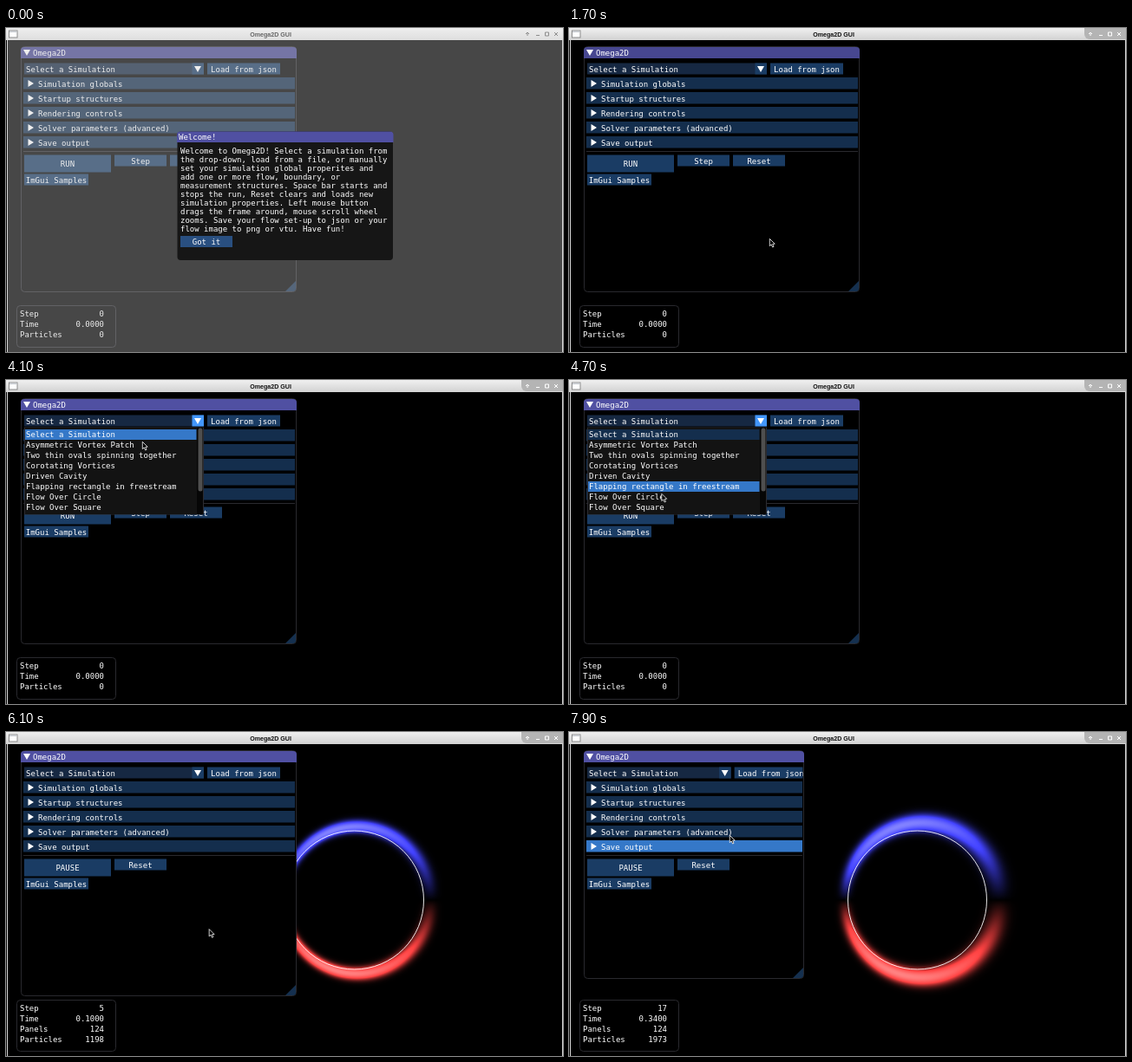
These frames come from a looping animation (642x374 px, 8000 ms). An HTML page with a canvas:

```html
<!DOCTYPE html>
<html lang="en">
<head>
<meta charset="utf-8">
<title>Omega2D GUI</title>
<style>
html, body { margin: 0; width: 642px; height: 374px; overflow: hidden; background: #000; }
canvas { display: block; }
</style>
</head>
<body>
<canvas id="stage" width="642" height="374"></canvas>
<script>
const LOOP = 8000, TICK = 100;
const ctx = document.getElementById('stage').getContext('2d');
const MONO = '9px "DejaVu Sans Mono", "Noto Sans Mono", monospace';
const C = {
  text: '#fff', button: '#1a3c64', header: '#142e4d', hot: '#3578c8', bright: '#4296fa',
  frame: '#162842', border: '#29292e', active: '#5050a2', idle: '#474790'
};
const HEADERS = ['Simulation globals', 'Startup structures', 'Rendering controls',
  'Solver parameters (advanced)', 'Save output'];
const CASES = ['Select a Simulation', 'Asymmetric Vortex Patch', 'Two thin ovals spinning together',
  'Corotating Vortices', 'Driven Cavity', 'Flapping rectangle in freestream',
  'Flow Over Circle', 'Flow Over Square'];
const WELCOME = ['Welcome to Omega2D! Select a simulation from',
  'the drop-down, load from a file, or manually', 'set your simulation global properites and',
  'add one or more flow, boundary, or', 'measurement structures. Space bar starts and',
  'stops the run, Reset clears and loads new', 'simulation properties. Left mouse button',
  'drags the frame around, mouse scroll wheel', 'zooms. Save your flow set-up to json or your',
  'flow image to png or vtu. Have fun!'];

// time, x, y
const POINTER = [
  [500, 630, 321], [800, 470, 300], [1300, 231, 243], [2000, 231, 243], [2400, 220, 83],
  [2700, 220, 83], [2800, 216, 46], [3700, 216, 46], [4000, 178, 62], [4100, 157, 71],
  [4600, 108, 126], [4800, 105, 136], [4900, 105, 136], [5000, 107, 133], [5700, 107, 133],
  [6400, 329, 298], [6700, 329, 298], [6900, 305, 286], [7000, 305, 286], [7400, 264, 278],
  [7600, 240, 230], [7800, 190, 131], [7900, 185, 119]
];
// time, right, bottom
const CORNER = [[6700, 335, 305], [6900, 329, 302], [7000, 329, 302], [7500, 271, 285]];

function along(keys, t) {
  if (t <= keys[0][0]) return keys[0].slice(1);
  for (let i = 1; i < keys.length; i++) {
    const a = keys[i - 1], b = keys[i];
    if (t <= b[0]) {
      const k = (t - a[0]) / (b[0] - a[0]);
      return [a[1] + (b[1] - a[1]) * k, a[2] + (b[2] - a[2]) * k];
    }
  }
  return keys[keys.length - 1].slice(1);
}

function rect(x, y, r, b, color) {
  ctx.fillStyle = color;
  ctx.fillRect(x, y, r - x, b - y);
}

function poly(color, ...p) {
  ctx.beginPath();
  for (let i = 0; i < p.length; i += 2) ctx.lineTo(p[i], p[i + 1]);
  ctx.closePath();
  ctx.fillStyle = color;
  ctx.fill();
}

function text(s, x, y, align = 'left') {
  ctx.font = MONO;
  ctx.textAlign = align;
  ctx.fillStyle = C.text;
  ctx.fillText(s, x, y);
}

function box(x, y, r, b, fill, stroke) {
  ctx.beginPath();
  ctx.roundRect(x + .5, y + .5, r - x - 1, b - y - 1, 4);
  ctx.fillStyle = fill;
  ctx.fill();
  if (stroke) {
    ctx.strokeStyle = stroke;
    ctx.lineWidth = 1;
    ctx.stroke();
  }
}

function button(label, x, y, r, b, color = C.button) {
  rect(x, y, r, b, color);
  text(label, (x + r) / 2, (y + b) / 2 + 3.5, 'center');
}

function band(x, y, r, b, radii, color) {
  ctx.beginPath();
  ctx.roundRect(x, y, r - x, b - y, radii);
  ctx.fillStyle = color;
  ctx.fill();
}

const flow = document.createElement('canvas');
flow.width = flow.height = 240;
const flowCtx = flow.getContext('2d');
let flowStep = -1;

// Two shear layers outside the wall, blue above and red below, thickening downstream.
function paintFlow(step) {
  if (step === flowStep) return;
  flowStep = step;
  const img = flowCtx.createImageData(240, 240);
  const growth = Math.sqrt(step / 17);
  for (let i = 0; i < 240 * 240; i++) {
    const x = i % 240 - 119, y = Math.floor(i / 240) - 119.5;
    const r = Math.hypot(x, y) || 1, cos = x / r, sin = y / r;
    const mid = 80 + 9 * growth * (1 + .6 * cos);
    const sigma = 2.6 + 3.7 * growth * (1 + .45 * cos);
    const amp = 1.9 * Math.min(1, step / 2) * Math.abs(sin) ** .9 * (1 - .25 * cos);
    const v = 255 * amp * Math.exp(-(((r - mid) / sigma) ** 2) / 2);
    img.data[i * 4] = sin > 0 ? v : v * .26;
    img.data[i * 4 + 1] = v * .26;
    img.data[i * 4 + 2] = sin > 0 ? v * .26 : v;
    img.data[i * 4 + 3] = 255;
  }
  flowCtx.putImageData(img, 0, 0);
}

function drawFlow(step) {
  if (step > 0) {
    paintFlow(step);
    ctx.drawImage(flow, 282, 74);
  }
  ctx.beginPath();
  ctx.arc(401.5, 194, 80, 0, Math.PI * 2);
  ctx.strokeStyle = '#fff';
  ctx.lineWidth = .9;
  ctx.stroke();
}

function drawPanel(t, hover) {
  const running = t >= 5400, open = t >= 3500 && !running;
  const [right, bottom] = along(CORNER, t);
  box(17, 21, right, bottom, '#000', C.border);
  band(17, 22, right, 35, [4, 4, 0, 0], t < 3500 ? C.idle : C.active);
  poly(C.text, 20, 25, 28, 25, 24, 32);
  text('Omega2D', 31, 31.7);

  ctx.save();
  ctx.beginPath();
  ctx.rect(17, 35, right - 18.5, bottom - 35);
  ctx.clip();
  const comboRight = 228 - .646 * (335 - right);
  const comboHot = t >= 2800 && !running;
  rect(21, 40.5, comboRight, 53.5, comboHot && !open ? '#173252' : C.frame);
  rect(comboRight - 13.5, 40.5, comboRight, 53.5, comboHot ? C.bright : C.button);
  poly(C.text, comboRight - 11, 44, comboRight - 3, 44, comboRight - 7, 51);
  text(CASES[0], 23, 50.6);
  button('Load from json', comboRight + 4, 40.5, comboRight + 88, 53.5);

  HEADERS.forEach((label, i) => {
    const y = 57 + 17 * i;
    const hot = !open && hover && hover[0] > 20 && hover[0] < right &&
      hover[1] >= y - 3 && hover[1] < y + 9;
    rect(20, y, right - 2, y + 13.5, hot ? C.hot : C.header);
    poly(C.text, 25.5, y + 3, 25.5, y + 11, 32, y + 7);
    text(label, 37, y + 10.6);
  });
  rect(20, 142, right - 2, 143, C.border);
  button(running ? 'PAUSE' : 'RUN', 21, 146.5, 121, 166.5);
  const actions = running ? ['Reset'] : ['Step', 'Reset'];
  actions.forEach((label, i) => button(label, 125 + 64 * i, 146.5, 185 + 64 * i, 159.5));
  button('ImGui Samples', 21, 168.5, 95, 181.5);
  ctx.restore();

  const grip = t >= 6800 && t < 7500 ? C.bright : t >= 6400 && t < 6800 ? '#2c65a8' : '#15304f';
  poly(grip, right - 1, bottom - 13, right - 1, bottom - 3, right - 3, bottom - 1, right - 13, bottom - 1);
}

function drawList(hover) {
  rect(21, 54.5, 228, 155.5, '#2c2c31');
  rect(22, 55, 227, 155, '#131313');
  CASES.forEach((label, i) => {
    const y = 57 + 12 * i;
    const hot = i === 0 ? hover[1] < 69 : hover[1] >= y && hover[1] < y + 12;
    if (hot || i === 0) rect(22, y, 219.5, y + 12, hot ? C.hot : C.header);
    text(label, 23, y + 9.4);
  });
  rect(220, 55, 227, 155, '#060606');
  box(221, 55, 227, 129, '#4f4f4f');
}

function drawStats(running, step) {
  const rows = [['Step', step], ['Time', (step * .02).toFixed(4)]];
  if (running) rows.push(['Panels', 124]);
  const count = running ? Math.round(255 + 1904.9 * (1 - Math.exp(-step / 7.32))) : 0;
  rows.push(['Particles', count]);
  box(12, running ? 309 : 320, 127, 369, '#000', C.border);
  rows.forEach(([name, value], i) => {
    const y = (running ? 322 : 333) + 12 * i;
    text(name, 16, y);
    text(value, 113, y, 'right');
  });
}

function drawWelcome(hot) {
  rect(2, 14, 641, 374, 'rgba(204,204,204,.35)');
  box(197, 119, 446.5, 268.5, '#161616');
  band(197, 119.5, 446.5, 132, [4, 4, 0, 0], C.active);
  text('Welcome!', 199, 129.4);
  WELCOME.forEach((line, i) => text(line, 201, 145.4 + 10 * i));
  button('Got it', 201, 240, 261, 253, hot ? C.bright : '#294f80');
}

function drawTitleBar(focused) {
  const g = ctx.createLinearGradient(0, 0, 0, 14);
  g.addColorStop(0, focused ? '#f0f0f0' : '#eeeeee');
  g.addColorStop(1, focused ? '#d2d2d2' : '#dedede');
  ctx.fillStyle = g;
  ctx.fillRect(0, 0, 642, 14);
  if (focused) band(594, 0, 642, 13, [0, 0, 0, 6], '#b4b4b4');
  rect(3, 2.5, 13.5, 11.5, '#8a8a8a');
  rect(4, 3.5, 12.5, 10.5, '#fff');
  rect(4, 3.5, 12.5, 5, '#c8ccd2');
  ctx.font = 'bold 7.1px "Liberation Sans", Arial, sans-serif';
  ctx.textAlign = 'center';
  ctx.fillStyle = focused ? '#111' : '#666';
  ctx.fillText('Omega2D GUI', 305, 9.6);

  ctx.strokeStyle = focused ? '#fff' : '#8c8c8c';
  ctx.lineWidth = 1;
  ctx.beginPath();
  ctx.moveTo(599, 7); ctx.lineTo(601, 5); ctx.lineTo(603, 7);
  ctx.moveTo(601, 5); ctx.lineTo(601, 9);
  ctx.moveTo(611, 8.5); ctx.lineTo(615, 8.5);
  ctx.rect(621.5, 5, 4, 4);
  ctx.moveTo(632, 5); ctx.lineTo(636, 9);
  ctx.moveTo(636, 5); ctx.lineTo(632, 9);
  ctx.stroke();
}

function drawPointer([x, y]) {
  ctx.save();
  ctx.translate(x, y);
  ctx.lineJoin = 'round';
  poly('#000', .3, .3, .3, 8.6, 2.2, 6.9, 3.6, 10, 5, 9.4, 3.7, 6.4, 6.2, 6.2);
  ctx.strokeStyle = '#fff';
  ctx.lineWidth = .8;
  ctx.stroke();
  ctx.restore();
}

function stepAt(t) {
  if (t <= 5500) return 0;
  if (t <= 6900) return Math.round((t - 5500) / 1400 * 11);
  return 11 + Math.round(Math.max(0, t - 7000) / 900 * 6);
}

function draw(t) {
  const running = t >= 5400, step = stepAt(t);
  const pointer = along(POINTER, t);
  const hover = along(POINTER, t - TICK); // widgets react one tick late
  rect(0, 0, 642, 374, '#000');
  if (running) drawFlow(step);
  drawPanel(t, t >= 1700 ? hover : null);
  drawStats(running, step);
  if (t < 1700) drawWelcome(t >= 1300);
  if (t >= 3500 && !running) drawList(hover);
  rect(1, 14, 2, 374, '#dcdcdc');
  rect(641, 14, 642, 374, '#dcdcdc');
  drawTitleBar(t >= 500);
  if (t >= 500) drawPointer(pointer);
}

const start = performance.now();
function frame() {
  const t = (performance.now() - start) % LOOP;
  draw(Math.floor(t / TICK) * TICK);
  requestAnimationFrame(frame);
}
frame();
</script>
</body>
</html>
```
